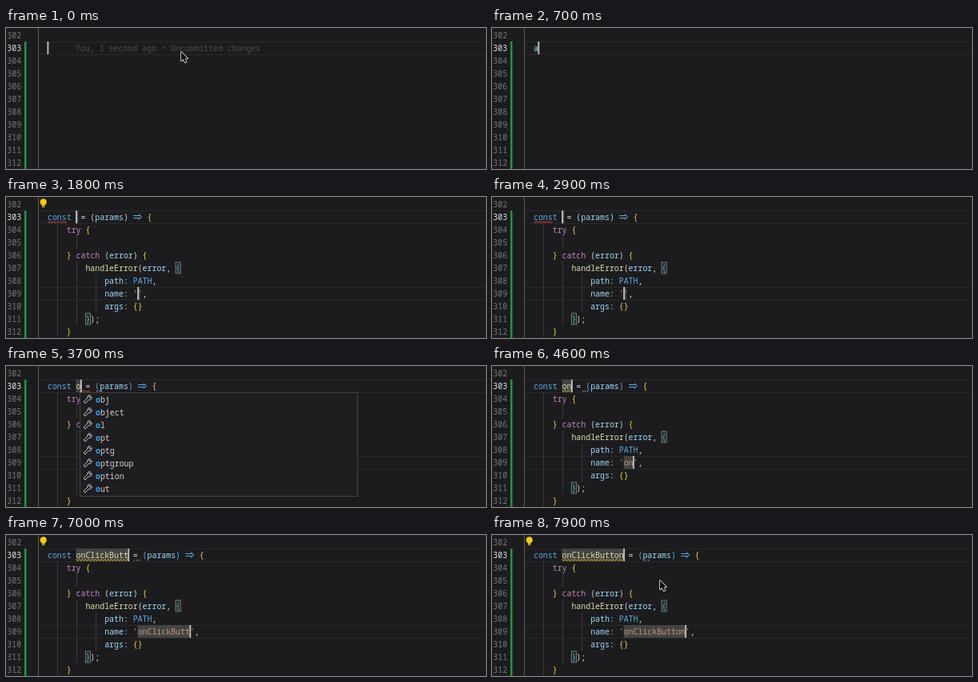
Animation, 600 px wide and 177 px high, one loop 8000 ms. Source, as an HTML page with a canvas:

```html
<!DOCTYPE html>
<html lang="en">
<head>
<meta charset="utf-8">
<title>Snippet expansion in a code editor</title>
<style>
html, body { margin: 0; width: 100%; height: 100%; overflow: hidden; background: #1c1c1e; }
canvas { display: block; width: 600px; height: 177px; }
</style>
</head>
<body>
<canvas id="stage"></canvas>
<script>
const LOOP = 8000, CHAR = 5.93, ROW = 16, LEFT = 52, BLINK = 530;
const FONT = '9.88px "Noto Sans Mono", "DejaVu Sans Mono", monospace';
const C = {
  bg: '#1c1c1e', text: '#d4d4d4', dim: '#a0a0a2', number: '#77777a', blue: '#5aade8', light: '#9cdcfe',
  control: '#c586c0', func: '#dcdcaa', string: '#ce9178', gold: '#f0cf50', match: '#2aa8f8',
  red: '#e5484d', yellow: '#cca700', border: '#454547', lineBorder: '#29292b'
};
const NAME = 'onClickButton';
const snippetKeys = [600, 800, 1000, 1400];
const nameKeys = [3600, 4200, 5600, 5800, 5900, 6000, 6200, 6500, 6700, 6900, 7000, 7100, 7400];
const EXPAND = 1800;
const allKeys = [0, ...snippetKeys, EXPAND, ...nameKeys];

// An underscore marks the next character as matching the typed text.
const suggestions = [
  ['var', '_a_f_terAll', ''],
  ['var', '_a_f_terEach', ''],
  ['cube', '_a_f_ter', 'lodash'],
  ['box', '_a_f_tc', 'Arrow Function with trycatch'],
  ['var', '_Auto_Fon_tSize', 'app/components/atoms/Avatar/index.stories'],
  ['cube', '_addSu_ffix_ToName', 'app/utils/common'],
  ['box', '_async _func_tion', 'Async Function Statement'],
  ['var', 'fa_A_ffilia_tetheme', '@fortawesome/free-brands-svg-icons'],
  ['var', 'fa_Accuso_f_t', '@fortawesome/free-brands-svg-icons']
];
const snippetOnly = [['box', '_a_f_t_c', 'Arrow Function with trycatch']];
const tagSuggestions = ['obj', 'object', 'ol', 'opt', 'optg', 'optgroup', 'option', 'out']
  .map(tag => ['wrench', '_' + tag, '']);

const canvas = document.getElementById('stage');
const ratio = window.devicePixelRatio || 1;
canvas.width = 600 * ratio;
canvas.height = 177 * ratio;
const g = canvas.getContext('2d');

const middle = line => 9 + ROW * (line - 302);
const column = n => LEFT + n * CHAR;
const pressed = (keys, t) => keys.filter(k => k <= t).length;

function rect(x, y, w, h, color) {
  g.fillStyle = color;
  g.fillRect(x, y, w, h);
}

function frame(x, y, w, h, color) {
  g.strokeStyle = color;
  g.lineWidth = 1;
  g.strokeRect(x + .5, y + .5, w - 1, h - 1);
}

function path(points, color, width = 1, close = false) {
  g.beginPath();
  points.forEach(([x, y]) => g.lineTo(x, y));
  if (close) g.closePath();
  g.strokeStyle = color;
  g.lineWidth = width;
  g.stroke();
}

// Every character sits on the monospaced grid; returns the x after the text.
function text(str, x, y, color, bold = false) {
  g.font = (bold ? 'bold ' : '') + FONT;
  g.fillStyle = color;
  for (const ch of str) {
    if (ch !== ' ') g.fillText(ch, x, y + 3.5);
    x += CHAR;
  }
  return x;
}

function tokens(parts, x, y) {
  for (const [str, color] of parts) {
    if (str === '=>') {
      arrow(x, y, color);
      x += 2 * CHAR;
    } else x = text(str, x, y, color);
  }
}

function arrow(x, y, color) {
  path([[x + .5, y - 1.5], [x + 9, y - 1.5]], color);
  path([[x + .5, y + 1.5], [x + 9, y + 1.5]], color);
  path([[x + 7, y - 3.5], [x + 11, y], [x + 7, y + 3.5]], color);
}

function squiggle(x1, x2, y, color) {
  const points = [];
  for (let x = x1, i = 0; x <= x2; x += 2, i++) points.push([x, y + (i % 2 ? 1.1 : -1.1)]);
  path(points, color);
}

function caret(x, y, t) {
  const since = t - Math.max(...allKeys.filter(k => k <= t));
  if (since % (2 * BLINK) < BLINK) rect(x - .5, y - 8, 1.8, 16, '#c4c4c2');
}

function bulb() {
  g.fillStyle = '#fc0';
  g.beginPath();
  g.arc(46.7, 6.2, 4, 0, 7);
  g.fill();
  rect(44.8, 9, 3.8, 2, '#fc0');
  rect(45, 11.6, 3.4, 1.3, '#fc0');
}

function pointer(x, y) {
  const shape = [[0, 0], [0, 11.5], [2.6, 9.2], [4.6, 13.4], [6.6, 12.5], [4.8, 8.4], [8.2, 8.2]];
  g.save();
  g.translate(x, y);
  g.lineJoin = 'round';
  path(shape, '#fff', 1.4, true);
  g.fillStyle = '#111';
  g.fill();
  g.restore();
}

const icons = {
  var(x, y) {
    path([[x - 3, y - 3.5], [x - 5, y - 3.5], [x - 5, y + 3.5], [x - 3, y + 3.5]], '#75beff');
    path([[x + 3, y - 3.5], [x + 5, y - 3.5], [x + 5, y + 3.5], [x + 3, y + 3.5]], '#75beff');
    path([[x - 2.5, y], [x, y - 2], [x + 2.5, y - .5], [x, y + 2]], '#75beff', 1, true);
  },
  cube(x, y) {
    const color = '#b180d7';
    path([[x, y - 5], [x + 4.5, y - 2.5], [x + 4.5, y + 2.5], [x, y + 5],
      [x - 4.5, y + 2.5], [x - 4.5, y - 2.5]], color, 1, true);
    path([[x - 4.5, y - 2.5], [x, y], [x + 4.5, y - 2.5]], color);
    path([[x, y], [x, y + 5]], color);
  },
  box(x, y) {
    frame(x - 5, y - 5, 10, 10, '#b8b8b8');
  },
  wrench(x, y) {
    path([[x - 5, y + 3], [x, y - 2], [x, y - 4], [x + 2, y - 5.5], [x + 3.5, y - 5], [x + 1.8, y - 3],
      [x + 3, y - 1.8], [x + 5, y - 3.5], [x + 5, y - 1], [x + 3, y + .8], [x + 1.3, y + .5],
      [x - 3, y + 5]], '#c5c5c5', 1, true);
  }
};

function popup(x, width, items, selected, iconX, labelX) {
  const y = 33, h = items.length * ROW + 3;
  rect(x, y, width, h, '#1e1e20');
  if (selected) rect(x + 1, y + 1, width - 2, ROW, '#303136');
  items.forEach(([icon, label, detail], i) => {
    const cy = 42 + ROW * i;
    icons[icon](iconX, cy);
    let cx = labelX, hit = false;
    for (const ch of label) {
      if (ch === '_') { hit = true; continue; }
      cx = text(ch, cx, cy, hit ? C.match : C.text, hit);
      hit = false;
    }
    text(detail, x + width - 7 - detail.length * CHAR, cy, C.dim);
  });
  frame(x, y, width, h, C.border);
}

function detailPanel(str) {
  rect(414, 33, 190, 35, '#1e1e20');
  frame(414, 33, 190, 35, C.border);
  text(str, 421, 47, C.dim);
}

function gutter() {
  for (let line = 302; line <= 312; line++)
    text(String(line), 1.3, middle(line), line === 303 ? '#e4e4e4' : C.number);
  rect(23, 17, 2.5, 160, '#23963b');
  rect(40, 0, 1, 177, '#5a5a5c');
}

function currentLine(line) {
  rect(41, middle(line) - 8, 559, 1, C.lineBorder);
  rect(41, middle(line) + 8, 559, 1, C.lineBorder);
}

function guides() {
  [[64, 304, 312], [88, 305, 305], [88, 307, 311], [112, 308, 310]].forEach(([x, from, to]) =>
    rect(x, middle(from) - 8, 1, ROW * (to - from + 1), '#39393b'));
}

function bracketBox(x, y) {
  rect(x - .5, y - 7.5, 7, 15, '#202a22');
  frame(x - .5, y - 7.5, 7, 15, '#77777a');
}

function expandedCode(t) {
  const count = pressed(nameKeys, t);
  const name = NAME.slice(0, count);
  const gap = count ? ' ' : '  ';
  const y = middle, nameX = column(6), fieldX = column(19);
  const paren = count ? C.blue : C.text;

  currentLine(309);
  guides();
  for (const [x, line] of [[nameX, 303], [fieldX, 309]])
    rect(x, y(line) - 8, Math.max(count * CHAR, 3), 16, '#434344');
  bracketBox(column(27), y(307));
  bracketBox(column(8), y(311));

  const head = count ? name + ' ' : ' ';
  tokens([['const ', C.blue], [head, C.func], ['= ', C.text], ['(', paren], ['params', C.light],
    [')', paren], [' ', C.text], ['=>', C.blue], [' {', C.gold]], LEFT, y(303));
  tokens([['try', C.control], [' {', C.gold]], column(4), y(304));
  tokens([['} ', C.gold], ['catch', C.control], [' (', C.text], ['error', C.light], [') ', C.text],
    ['{', C.gold]], column(4), y(306));
  tokens([['handleError', C.func], ['(', C.text], ['error', C.light], [', ', C.text], ['{', C.blue]],
    column(8), y(307));
  tokens([['path: ', C.light], ['PATH', C.blue], [',', C.text]], column(12), y(308));
  tokens([['name: ', C.light], ["'" + name + "'", C.string], [',', C.text]], column(12), y(309));
  tokens([['args: ', C.light], ['{}', C.gold]], column(12), y(310));
  tokens([['}', C.blue], [');', C.text]], column(8), y(311));
  text('}', column(4), y(312), C.gold);

  if (!count) squiggle(LEFT, 76, 31.5, C.red);
  else if (count === 1) squiggle(95, 105, 31.5, C.red);
  if (count) {
    if (count > 1) squiggle(nameX, column(6 + count), 31.5, C.yellow);
    const dots = count === 13 ? 189 : count > 7 ? 160 : count > 2 ? 153 : 113;
    for (let i = 0; i < 3; i++) rect(dots + i * 3, 31, 1.2, 1.2, '#b5b5b5');
  }
  caret(column(6 + count), y(303), t);
  caret(column(19 + count), y(309), t);

  if (count === 1) popup(92, 348, tagSuggestions, false, 102, 112);
}

function typingSnippet(t) {
  const count = pressed(snippetKeys, t);
  const y = middle(303);
  if (!count) text('You, 1 second ago • Uncommitted changes', 87, y, '#4b4b4d');
  text('aftc'.slice(0, count), LEFT, y, C.light);
  if (count > 2) squiggle(LEFT, column(count), 31.5, C.red);
  caret(column(count), y, t);
  if (count === 3) {
    popup(68, 343, suggestions, true, 78, 88);
    detailPanel('var afterAll: jest.Lifecycle');
  } else if (count === 4) {
    popup(68, 343, snippetOnly, true, 78, 88);
    detailPanel('Arrow Function with trycatch');
  }
}

function draw(t) {
  g.setTransform(ratio, 0, 0, ratio, 0, 0);
  rect(0, 0, 600, 177, C.bg);
  currentLine(303);
  gutter();
  if (t < EXPAND) typingSnippet(t);
  else expandedCode(t);
  if ((t >= 1100 && t < 2300) || t >= 4900) bulb();
  if (t < snippetKeys[0]) pointer(219, 30);
  if (t >= 7600) {
    const p = Math.min(1, (t - 7600) / 300);
    pointer(219 - 9 * p, 30 + 27 * p);
  }
}

function tick(now) {
  draw(Math.floor(now % LOOP / 100) * 100);
  requestAnimationFrame(tick);
}
requestAnimationFrame(tick);
</script>
</body>
</html>
```
